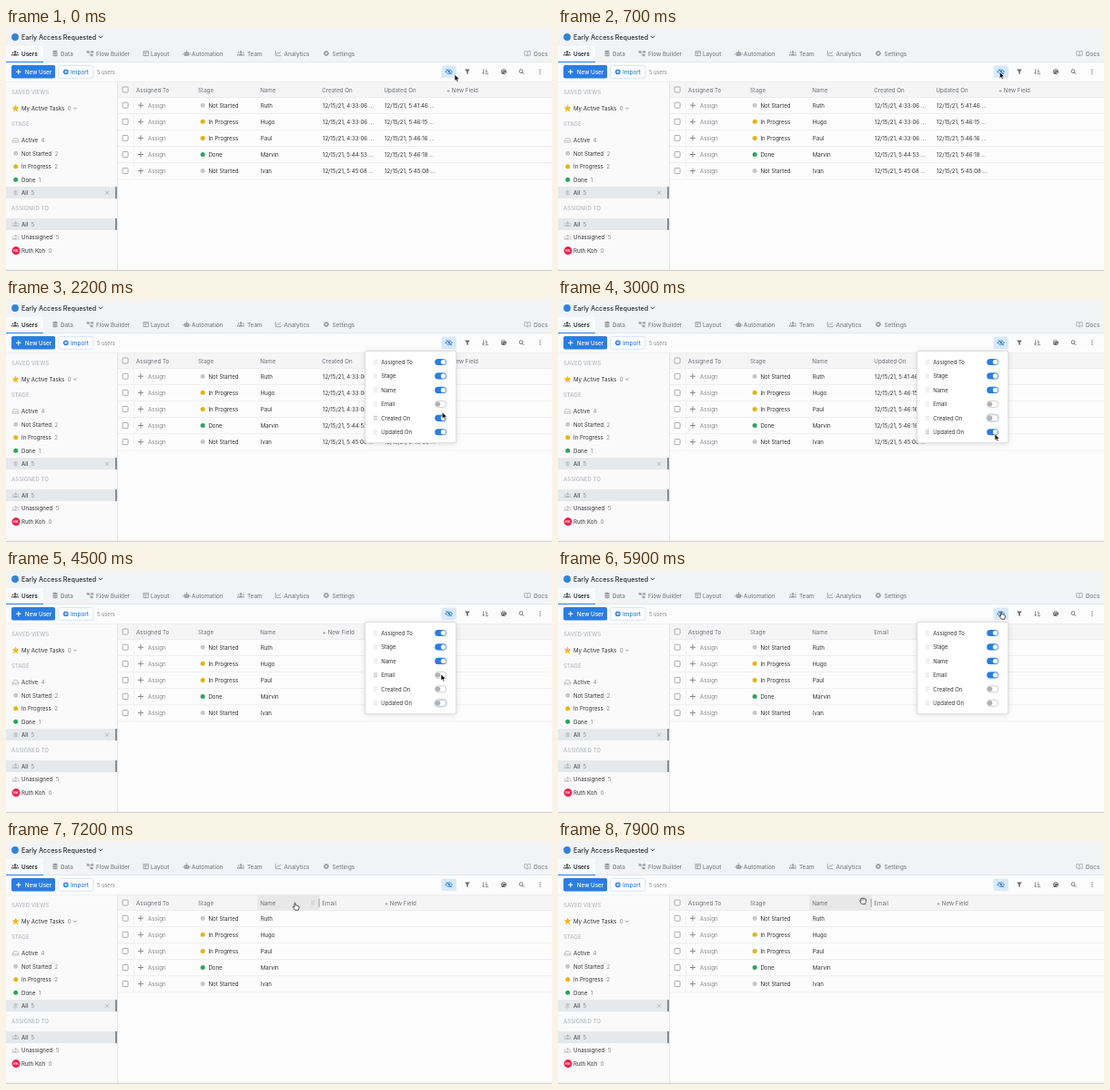
An HTML page with a canvas for the animation above (8 s loop, 600 px wide and 268 px high).

```html
<!DOCTYPE html>
<html lang="en">
<head>
<meta charset="utf-8">
<title>Column visibility</title>
<style>
  html, body { margin: 0; width: 100%; height: 100%; overflow: hidden; background: #fcfcfc; }
  canvas { display: block; width: 600px; height: 268px; }
</style>
</head>
<body>
<canvas id="stage"></canvas>
<script>
const W = 600, H = 268, LOOP = 8000;
const canvas = document.getElementById('stage');
const c = canvas.getContext('2d');
const dpr = window.devicePixelRatio || 1;
canvas.width = W * dpr;
canvas.height = H * dpr;

const BLUE = '#2b7de0', INK = '#303236', GRAY = '#85888d', SOFT = '#96999e', PALE = '#b7babf';
const STAGES = { 'Not Started': '#c7c8ca', 'In Progress': '#e8b210', 'Done': '#2ba45a' };

const rows = [
  ['Not Started', 'Ruth', '12/15/21, 4:33:06 ...', '12/15/21, 5:41:46 ...'],
  ['In Progress', 'Hugo', '12/15/21, 4:33:06 ...', '12/15/21, 5:46:15 ...'],
  ['In Progress', 'Paul', '12/15/21, 4:33:06 ...', '12/15/21, 5:46:16 ...'],
  ['Done', 'Marvin', '12/15/21, 5:44:53 ...', '12/15/21, 5:46:18 ...'],
  ['Not Started', 'Ivan', '12/15/21, 5:45:08 ...', '12/15/21, 5:45:08 ...']
];

// Times of the interactions, in ms.
const OPEN = 1070, HIDE_CREATED = 2400, HIDE_UPDATED = 3200, SHOW_EMAIL = 5100, CLOSE = 5960;

const path = [
  [0, 493, 51.5], [800, 485, 48.5], [1450, 485, 48.5], [2300, 479, 128], [2500, 479, 128],
  [3000, 480, 149], [4050, 480, 149], [4500, 478, 115], [5300, 478, 115], [5850, 487, 46.5],
  [6650, 487, 46.5], [7200, 317.5, 68.5], [7400, 318, 68.5], [7800, 335, 66], [8000, 335, 66]
];

const clamp = v => Math.max(0, Math.min(1, v));
const smooth = v => v * v * (3 - 2 * v);
const ramp = (t, start, span = 120) => smooth(clamp((t - start) / span));

function pointer(t) {
  const i = Math.max(1, path.findIndex(p => p[0] > t));
  const [t0, x0, y0] = path[i - 1], [t1, x1, y1] = path[i];
  const k = smooth((t - t0) / (t1 - t0));
  return { x: x0 + (x1 - x0) * k, y: y0 + (y1 - y0) * k };
}

// Text is set large and scaled down so that glyph spacing stays fractional.
function text(s, x, y, size = 6.12, color = INK, weight = 400, align = 'left') {
  const k = 8;
  c.save();
  c.translate(x, y + size * 0.4);
  c.scale(1 / k, 1 / k);
  c.font = `${weight} ${size * k}px Inter, "Liberation Sans", sans-serif`;
  c.textAlign = align;
  c.fillStyle = color;
  c.fillText(s, 0, 0);
  const width = c.measureText(s).width / k;
  c.restore();
  return width;
}

function rect(x, y, w, h, color) {
  c.fillStyle = color;
  c.fillRect(x, y, w, h);
}

function box(x, y, w, h, r, fill, stroke, lw = 0.7) {
  c.beginPath();
  c.roundRect(x, y, w, h, r);
  if (fill) { c.fillStyle = fill; c.fill(); }
  if (stroke) { c.strokeStyle = stroke; c.lineWidth = lw; c.stroke(); }
}

function disc(x, y, r, fill, stroke, lw = 0.8) {
  c.beginPath();
  c.arc(x, y, r, 0, 7);
  if (fill) { c.fillStyle = fill; c.fill(); }
  if (stroke) { c.strokeStyle = stroke; c.lineWidth = lw; c.stroke(); }
}

// Draws an SVG path around (x, y).
function shape(d, x, y, fill, stroke, lw = 0.9) {
  const p = new Path2D(d);
  c.save();
  c.translate(x, y);
  c.lineJoin = c.lineCap = 'round';
  if (fill) { c.fillStyle = fill; c.fill(p); }
  if (stroke) { c.strokeStyle = stroke; c.lineWidth = lw; c.stroke(p); }
  c.restore();
}

const plus = (x, y, r, color, lw = 1) => shape(`M${-r} 0H${r}M0 ${-r}V${r}`, x, y, null, color, lw);
const chevron = (x, y, r, color) => shape(`M${-r} ${-r / 2}L0 ${r / 2}L${r} ${-r / 2}`, x, y, null, color);

function grip(x, y, color) {
  for (let i = 0; i < 6; i++) rect(x + (i % 2) * 2 - 1.5, y + (i >> 1) * 1.9 - 2.4, 1, 1, color);
}

function people(x, y, color) {
  disc(x, y - 1.5, 1.3, color);
  shape('M-2.3 2.6C-2.3 -.5 2.3 -.5 2.3 2.6Z', x, y, color);
  disc(x - 2.6, y - 0.7, 0.8, color);
  disc(x + 2.6, y - 0.7, 0.8, color);
  shape('M-4 2.4C-4 .6 -2.9 .5 -2.4 1L-2.8 2.4ZM4 2.4C4 .6 2.9 .5 2.4 1L2.8 2.4Z', x, y, color);
}

const icons = {
  Users: x => people(x, 28, '#4b4e53'),
  Data: x => {
    shape('M-2.5 -2.2C-2.5 -3.6 2.5 -3.6 2.5 -2.2V2.2C2.5 3.6 -2.5 3.6 -2.5 2.2Z', x, 28, SOFT);
    shape('M-2.5 -1.1C-2 -.2 2 -.2 2.5 -1.1M-2.5 1.1C-2 2 2 2 2.5 1.1', x, 28, null, '#f2f3f5', 0.6);
  },
  'Flow Builder': x => shape('M-3.3 -2.6H-1.4V-.7H-3.3ZM1.4 -2.6H3.3V-.7H1.4ZM.8 1H2.7V2.9H.8ZM-1.4 -1.7H1.4M-1.4 -1L.8 1.8', x, 28, SOFT, SOFT, 0.5),
  Layout: x => shape('M-2.6 -2.6H2.6V2.6H-2.6ZM-2.6 -.9H2.6M-.7 -.9V2.6', x, 28, null, SOFT, 0.8),
  Automation: x => {
    box(x - 2.6, 26.6, 5.2, 4.2, 1, SOFT);
    shape('M0 -1.5V-3M-3.5 0V1.5M3.5 0V1.5', x, 28, null, SOFT, 0.8);
    disc(x - 1.1, 28.4, 0.5, '#f2f3f5');
    disc(x + 1.1, 28.4, 0.5, '#f2f3f5');
  },
  Team: x => people(x, 28, SOFT),
  Analytics: x => shape('M-2.8 -2.6V2.6H3M-1.7 .9L-.4 -.8L.9 .2L2.6 -2', x, 28, null, SOFT, 0.8),
  Settings: x => {
    for (let i = 0; i < 8; i++) {
      const a = i * Math.PI / 4;
      disc(x + 2.4 * Math.cos(a), 28 + 2.4 * Math.sin(a), 0.7, SOFT);
    }
    disc(x, 28, 1.8, null, SOFT, 1.2);
  },
  Docs: x => shape('M0 -2C-1 -2.7 -2.7 -2.7 -3.2 -2.3V2.2C-2.3 1.8 -1 2 0 2.7C1 2 2.3 1.8 3.2 2.2V-2.3C2.7 -2.7 1 -2.7 0 -2V2.7', x, 28, null, SOFT, 0.7)
};

const tabs = [
  ['Users', 10, 17], ['Data', 54, 60], ['Flow Builder', 92.5, 99], ['Layout', 154, 159],
  ['Automation', 198.5, 204], ['Team', 258, 265], ['Analytics', 299, 305.5], ['Settings', 352, 358.5],
  ['Docs', 573, 580]
];

function drawHeader() {
  rect(0, 0, W, 38, '#f2f3f5');
  disc(10, 10, 3.9, '#3182d8');
  text('Early Access Requested', 17, 10, 7.1, '#25272b', 500);
  chevron(104, 10, 2, '#55585d');
  rect(0, 20, 41, 18, '#f9fafa');
  rect(41, 37.4, W - 41, 0.7, '#dfe1e4');
  rect(0, 37, 41, 1, BLUE);
  for (const [name, ix, tx] of tabs) {
    icons[name](ix);
    const active = name === 'Users';
    text(name, tx, 28.2, 6.3, active ? '#222428' : '#7d8085', active ? 600 : 500);
  }
}

function drawToolbar() {
  rect(0, 38.2, W, 21, '#fcfcfc');
  box(6, 41, 48, 14.6, 1.8, BLUE);
  plus(13.8, 48.3, 2.3, '#fff', 1.1);
  text('New User', 20.8, 48.3, 6.3, '#fff', 500);
  box(57.6, 41.4, 38.2, 13.9, 1.8, '#fff', '#c5dcf6');
  disc(65.8, 48.3, 2.9, BLUE);
  plus(65.8, 48.3, 1.5, '#fff', 0.8);
  text('Import', 71, 48.3, 6.4, BLUE, 500);
  text('5 users', 100, 48.3, 5.7, GRAY);

  box(478.5, 41.5, 16.5, 13.5, 2, '#d8eafb');
  shape('M-3.6 0C-2 -3 2 -3 3.6 0C2 3 -2 3 -3.6 0Z', 486.8, 48.2, null, BLUE, 0.9);
  disc(486.8, 48.2, 1.1, BLUE);
  shape('M-2.8 -2.8L2.8 2.8', 486.8, 48.2, null, BLUE, 1);

  const dark = '#6b6e73';
  shape('M-2.8 -2.8H2.8L.8 0V2.8L-.8 2V0Z', 507, 48.3, dark);
  shape('M-2 -2.6V2.4M-3 1.4L-2 2.4L-1 1.4M.7 -2.3H1.5M.7 -.7H2.1M.7 .9H2.7M.7 2.5H3.2', 526.5, 48.2, null, dark, 0.7);
  disc(547, 48.2, 2.9, dark);
  for (const [dx, dy] of [[-1.6, 0], [-0.7, -1.5], [0.9, -1.5], [1.3, 1.5]]) disc(547 + dx, 48.2 + dy, 0.6, '#fcfcfc');
  disc(566, 47.6, 1.9, null, dark, 0.9);
  shape('M1.4 1L3 2.6', 566, 48, null, dark, 1);
  for (const dy of [-2.2, 0, 2.2]) disc(587, 48.2 + dy, 0.7, dark);
  rect(0, 59, W, 0.7, '#e1e3e5');
}

function sideRow(label, count, y, selected) {
  if (selected) {
    rect(0, y - 6.5, 122, 13, '#e6e9eb');
    rect(120, y - 6.5, 2, 13, '#888c91');
  }
  const w = text(label, 17, y, 6.12, INK);
  text(count, 20.4 + w, y, 6.12, GRAY);
}

function layers(x, y) {
  for (const dy of [1.5, 0, -1.5]) shape('M-3 0L0 -1.6L3 0L0 1.6Z', x, y + dy, '#c2c5c8', '#e6e9eb', 0.4);
}

function drawSidebar() {
  rect(0, 59.7, 122, H, '#fafafa');
  rect(122, 59.7, 0.8, H, '#dddfe1');
  text('SAVED VIEWS', 6, 71, 6.05, PALE, 500);
  text('STAGE', 6, 106, 6.05, PALE, 500);
  text('ASSIGNED TO', 6, 199, 6.05, PALE, 500);

  sideRow('My Active Tasks', 0, 88.5);
  chevron(76, 88.7, 1.3, GRAY);
  sideRow('Active', 4, 123.8);
  sideRow('Not Started', 2, 138.2);
  sideRow('In Progress', 2, 152.8);
  sideRow('Done', 1, 167.2);
  sideRow('All', 5, 181.6, true);
  sideRow('All', 5, 216.4, true);
  sideRow('Unassigned', 5, 231);
  sideRow('Ruth Koh', 0, 245.6);

  let star = '';
  for (let i = 0; i < 10; i++) {
    const a = i * Math.PI / 5 - Math.PI / 2, r = i % 2 ? 1.9 : 4.3;
    star += `${i ? 'L' : 'M'}${r * Math.cos(a)} ${r * Math.sin(a)}`;
  }
  shape(star + 'Z', 10.5, 88.7, '#f3b51d');
  shape('M-3.2 .5L-2 -2.2H2L3.2 .5V2.4H-3.2ZM-3.2 .5H-1L-.5 1.3H.5L1 .5H3.2', 10.5, 123.8, null, '#b0b3b7', 0.7);
  Object.values(STAGES).forEach((color, i) => disc(10.7, 138.2 + i * 14.5, 2.5, color));
  layers(10.5, 181.8);
  shape('M-1.7 -1.7L1.7 1.7M1.7 -1.7L-1.7 1.7', 111.2, 181.8, null, '#a2a5a9', 0.7);
  people(10.5, 216.4, '#b9bcc0');
  people(10.5, 231, '#b9bcc0');
  shape('M-3.6 -3L3.6 3', 10.5, 231, null, '#fafafa', 1);
  disc(11, 245.6, 4.5, '#ea2450');
  text('RK', 11, 245.6, 4, '#fff', 500, 'center');
}

function checkbox(y) {
  box(128.1, y - 3, 6, 6, 0.9, '#fff', '#96999e', 0.8);
}

function drawTable(t, mouse, panelOpen) {
  const columns = ['Assigned To', 'Stage', 'Name'];
  if (t >= SHOW_EMAIL) columns.push('Email');
  if (t < HIDE_CREATED) columns.push('Created On');
  if (t < HIDE_UPDATED) columns.push('Updated On');
  const left = i => 140 + i * 68.1;

  rect(122.8, 59.7, W, 16.5, '#f5f5f6');
  checkbox(68);
  columns.forEach((name, i) => {
    const x = left(i);
    const hot = !panelOpen && mouse.y > 60 && mouse.y < 76 && mouse.x >= x && mouse.x < x + 68;
    if (hot) {
      rect(x, 59.7, 68.1, 16.5, '#e8e8e9');
      grip(x + 61, 68, '#b0b2b5');
      rect(x + 67.2, 63.5, 1.4, 9.5, '#b2b4b7');
    }
    text(name, x + 3, 68.1, 6.2, '#6b6e73');
  });
  text('+ New Field', left(columns.length) + 3.5, 68.1, 6.2, '#6b6e73');
  rect(122.8, 76, W, 0.6, '#e3e4e6');

  rows.forEach((row, r) => {
    const y = 85.2 + r * 18.1;
    checkbox(y);
    plus(148, y, 2.7, '#7a7d82', 0.9);
    text('Assign', 156, y, 6.15, GRAY);
    disc(216.2, y, 2.5, STAGES[row[0]]);
    text(row[0], 222.4, y);
    text(row[1], 279.8, y);
    columns.forEach((name, i) => {
      if (name === 'Created On') text(row[2], left(i) + 3.6, y);
      if (name === 'Updated On') text(row[3], left(i) + 3.6, y);
    });
    rect(122.8, y + 9, W, 0.6, '#e6e7e9');
  });
  rect(140, 59.7, 0.5, 107, '#eaebec');
}

function toggle(x, y, on, focus) {
  if (focus) box(x - 7.4, y - 4.7, 14.8, 9.4, 4.7, '#c4ddf8');
  if (on < 1) box(x - 6.2, y - 3.5, 12.4, 7, 3.5, '#fff', '#b9bbbe', 0.7);
  c.save();
  c.globalAlpha *= on;
  box(x - 6.4, y - 3.6, 12.8, 7.2, 3.6, BLUE);
  c.restore();
  disc(x - 3 + 6 * on, y, 2.7, on > 0.5 ? '#fff' : '#b0b2b5');
}

function drawPanel(t, mouse, alpha) {
  const fields = [
    ['Assigned To', 1], ['Stage', 1], ['Name', 1],
    ['Email', ramp(t, SHOW_EMAIL - 60), t >= SHOW_EMAIL && t < 5650],
    ['Created On', 1 - ramp(t, HIDE_CREATED - 60), t >= HIDE_CREATED && t < HIDE_UPDATED],
    ['Updated On', 1 - ramp(t, HIDE_UPDATED - 60), t >= HIDE_UPDATED && t < SHOW_EMAIL]
  ];
  c.save();
  c.globalAlpha = alpha;
  c.save();
  c.shadowColor = 'rgba(20,25,35,.12)';
  c.shadowBlur = 6 * dpr;
  c.shadowOffsetY = dpr;
  box(394.5, 57.3, 100.3, 101.5, 2, '#fff');
  c.restore();
  box(394.5, 57.3, 100.3, 101.5, 2, '#fff', '#cfd1d4', 0.8);
  fields.forEach(([name, on, focus], i) => {
    const y = 69.5 + i * 15.45;
    const hot = Math.abs(mouse.y + 1 - y) < 7.7;
    grip(406, y, hot ? '#777a7f' : '#c3c5c8');
    text(name, 412.2, y, 5.95, INK, 400);
    toggle(477.6, y, on, focus);
  });
  c.restore();
}

function drawPointer(t, { x, y }) {
  if (t < 5650) {
    shape('M0 0V7L1.6 5.5L2.7 8L4 7.4L2.9 5L5.1 4.9Z', x, y, '#111', '#fff', 0.6);
  } else if (t < 7480) {
    shape('M-.7 .3C-.7 -.5 .7 -.5 .7 .3V2.6C1.4 2 2.1 2.3 2.2 2.9C2.9 2.5 3.5 2.8 3.5 3.4C4.2 3.2 4.6 3.6 4.6 4.2C4.6 5.7 4 6.4 3.8 7.7H.2C-.2 6.6 -1.5 5.5 -2.2 4.5C-2.6 3.8 -1.6 3.2 -.7 4.3Z', x, y, '#fff', '#222', 0.75);
  } else {
    shape('M-2.2 -.7C-2.8 -2.7 -1.5 -3.2 -1 -2.2C-.8 -3.7 .5 -3.6 .7 -2.4C1.2 -3.4 2.2 -2.9 2.2 -1.9C2.9 -2.4 3.6 -1.8 3.5 -.8C3.4 1.4 2.7 2 2.5 3.4H-1.4C-1.7 2.2 -3 1.5 -3.3 .4C-3.5 -.4 -2.8 -.6 -2.2 0Z', x, y, '#fff', '#222', 0.75);
    shape('M-.9 -2V-.7M.7 -2.2V-.7M2.2 -1.8V-.7', x, y, null, '#444', 0.5);
  }
}

function draw(t) {
  const mouse = pointer(t);
  const alpha = ramp(t, OPEN, 110) * (1 - ramp(t, CLOSE, 130));
  c.setTransform(dpr, 0, 0, dpr, 0, 0);
  rect(0, 0, W, H, '#fcfcfc');
  drawHeader();
  drawToolbar();
  drawTable(t, mouse, alpha > 0);
  drawSidebar();
  rect(0, 266.8, W, 1.2, '#cfd1d4');
  if (alpha > 0) drawPanel(t, mouse, alpha);
  drawPointer(t, mouse);
}

const start = performance.now();
function tick() {
  draw((performance.now() - start) % LOOP);
  requestAnimationFrame(tick);
}
tick();
</script>
</body>
</html>
```
